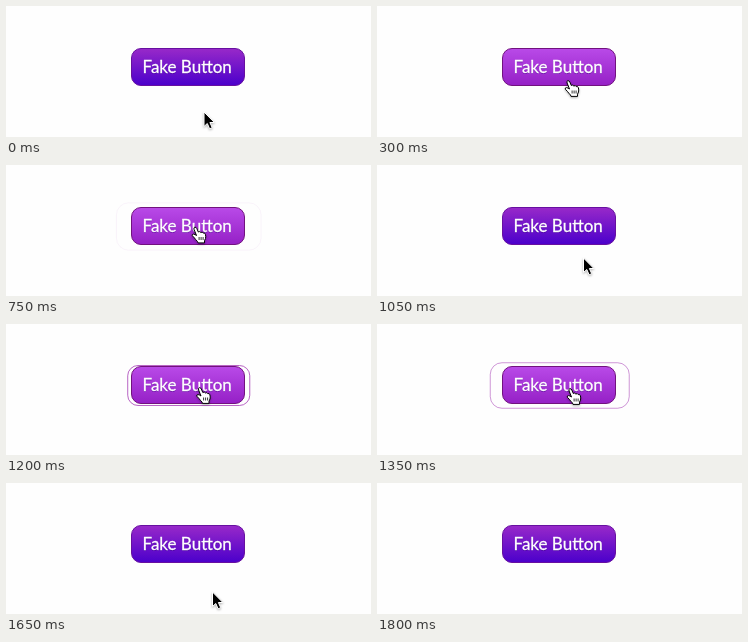
Recreate the animation shown at these times as an HTML page. Size 365 by 131 pixels, loop 2.1 s.

```html
<!DOCTYPE html>
<html lang="en">
<head>
<meta charset="utf-8">
<style>
  html, body { margin: 0; width: 100%; height: 100%; overflow: hidden; background: #fefefe; }
  svg { display: block; width: 365px; height: 131px; }
  text { font: 17px Lato, sans-serif; fill: #fff; stroke: #fff; stroke-width: .3px; }
  .shade { fill: #3a0080; stroke: none; opacity: .5; }
  #ring { fill: none; stroke: #a030b0; }
  #arrow, #hand { filter: drop-shadow(0 1px 1px rgba(0, 0, 0, .3)); }
</style>
</head>
<body>
<svg viewBox="0 0 365 131">
  <defs>
    <linearGradient id="idle" x2="0" y2="1">
      <stop stop-color="#9829c9"/><stop offset="1" stop-color="#4b00cb"/>
    </linearGradient>
    <linearGradient id="hover" x2="0" y2="1">
      <stop stop-color="#b94ae8"/><stop offset="1" stop-color="#9520c6"/>
    </linearGradient>
  </defs>
  <rect id="ring"/>
  <rect id="button" x="125.5" y="42.5" width="113" height="37" rx="9.5"/>
  <text class="shade" x="136.5" y="67.5">Fake Button</text>
  <text x="136.5" y="66.5">Fake Button</text>
  <path id="arrow" d="M0 0V14.5L3.3 11.5 5.6 16.8 8.2 15.7 5.9 10.5H10.4Z" stroke="#fff"/>
  <g id="hand" stroke="#000" stroke-linejoin="round">
    <path fill="#fff" d="M5 9L2.6 3Q2 1 3.3 .7Q4.7 .5 5.3 2L6.8 5.5Q8.5 4.3 9.3 6Q11 5 11.7 6.6Q13.4 6 13.9 7.8Q14.5 10 14 12L13 14.2V16.4H6.5L6 15Q4 13 3 11.5L.8 9.2Q.3 7.6 2 7.6Q3.5 7.8 5 9Z"/>
    <path stroke-width=".8" d="M7.6 10.5V13.5M9.6 10.5V13.5M11.6 10.5V13.5"/>
  </g>
</svg>
<script>
const LOOP = 2100;
// start time, cursor, x, y, ring scale, ring opacity
const steps = [
  [0, 'arrow', 198, 106, 1, 0],
  [300, 'hand', 187.5, 74, 1, 0],
  [450, 'hand', 186, 62, 1.16, .6],
  [600, 'hand', 185.5, 61.5, 1.27, .28],
  [750, 'hand', 185.5, 61.5, 1.28, .05],
  [900, 'arrow', 209, 112, 1, 0],
  [1050, 'arrow', 206.5, 93, 1, 0],
  [1200, 'hand', 190, 63, 1.08, .75],
  [1350, 'hand', 189.5, 64, 1.23, .5],
  [1500, 'hand', 189, 65, 1.28, .32],
  [1650, 'arrow', 206.5, 109, 1, 0],
  [1800, 'none', 0, 0, 1, 0]
];
const $ = id => document.getElementById(id);
const set = (id, attrs) => {
  for (const key in attrs) $(id).setAttribute(key, attrs[key]);
};

function draw(now) {
  const t = now % LOOP;
  const [, cursor, x, y, scale, opacity] = steps.findLast(s => s[0] <= t);
  const over = cursor === 'hand';
  set('button', {
    fill: over ? 'url(#hover)' : 'url(#idle)',
    stroke: over ? '#72127f' : '#6710a0'
  });
  for (const id of ['arrow', 'hand']) {
    set(id, { transform: `translate(${x} ${y})`, display: id === cursor ? 'inline' : 'none' });
  }
  const w = 113 * scale, h = 37 * scale;
  set('ring', { x: 182.75 - w / 2, y: 61.5 - h / 2, width: w, height: h, rx: 9.5 * scale, opacity });
  requestAnimationFrame(draw);
}
draw(0);
</script>
</body>
</html>
```
